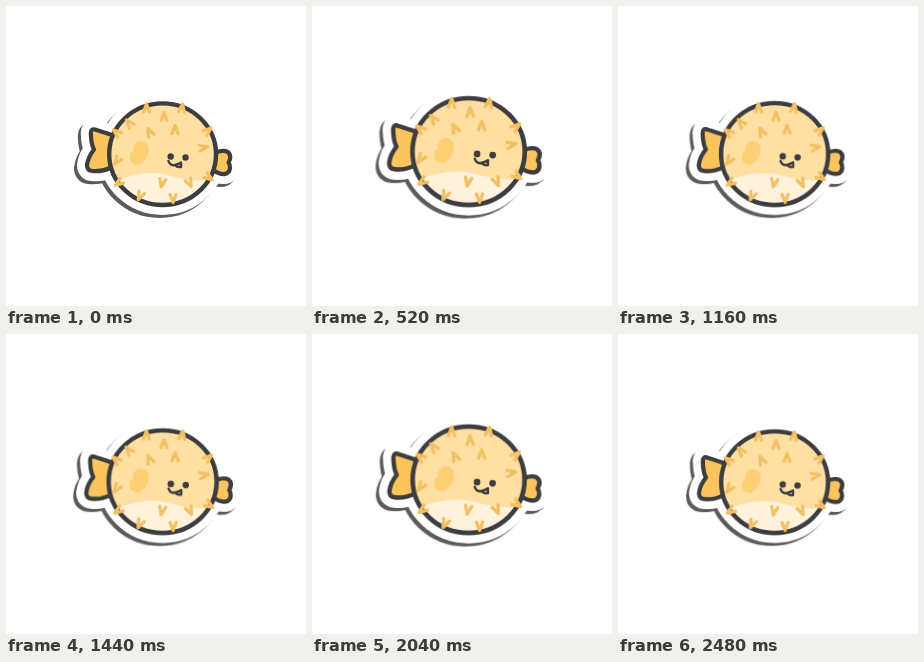
Write an HTML page without scripts that moves like this. It is 300 px wide and 300 px high and loops after 2.52 s.

```html
<!DOCTYPE html>
<html lang="en">
<head>
<meta charset="utf-8">
<title>Pufferfish sticker</title>
<style>
  html, body { margin: 0; width: 100%; height: 100%; overflow: hidden; background: #fff; }
  svg { display: block; width: 100vw; height: 100vh; }
  .fish {
    transform-origin: 157px 200px;
    animation: puff 1260ms cubic-bezier(.37, 0, .63, 1) infinite;
  }
  @keyframes puff {
    0%, 100% { transform: scale(1); animation-timing-function: cubic-bezier(.37, 0, .63, 1); }
    50% { transform: scale(1.055); }
  }

  .sticker { fill: #fff; stroke: #fff; stroke-width: 20; stroke-linejoin: round; filter: drop-shadow(-2.5px 3.7px 0 #5c5a5a); }
  .fins { fill: #fcc45c; stroke: #3d3d3f; stroke-width: 4.2; stroke-linejoin: round; }
  .spikes, .mouth { fill: none; stroke-linecap: round; stroke-linejoin: round; }
  .spikes { stroke: #f3c064; stroke-width: 3.2; }
  .mouth { stroke: #3d3d3f; stroke-width: 2.4; }
</style>
</head>
<body>
<svg viewBox="0 0 300 300">
  <defs>
    <ellipse id="round" cx="156.600" cy="148.200" rx="53.400" ry="50.800"/>
    <path id="tail" d="M106 129 L89 123.500 Q85 122.500 84.800 127 Q85 138 88 143.500 Q82 151 81 159 Q81 164.500 86 165 Q96 166 104 162"/>
    <path id="fin" d="M209 147.500 C213 144.500 221 143.500 223.500 148 C225.500 152 223.500 154.500 222.500 156.500 C224.500 159 225 165 221 167.300 C217 169 212 167.500 207 164"/>
    <path id="spike" d="M-3 4 L0 -4 L3 4"/>
    <clipPath id="inside"><use href="#round"/></clipPath>
  </defs>

  <g class="fish">
    <g class="sticker">
      <use href="#tail"/>
      <use href="#fin"/>
      <use href="#round"/>
    </g>

    <g class="fins">
      <use href="#tail"/>
      <use href="#fin"/>
    </g>

    <use href="#round" fill="#ffdfa2"/>
    <path clip-path="url(#inside)" fill="#fff2dd" d="M98 172 Q112 174 122 171 Q140 165 158 168 Q178 174 192 174.500 Q204 175 215 173 V205 H98Z"/>
    <g fill="#ffcf75">
      <circle cx="135" cy="143" r="7.700"/>
      <circle cx="131" cy="151.500" r="7.300"/>
      <path d="M131 159 Q141 156 142.800 145 L130 144Z"/>
    </g>
    <use href="#round" fill="none" stroke="#3d3d3f" stroke-width="4.400"/>

    <g class="spikes">
      <use href="#spike" transform="translate(140.500 102)"/>
      <use href="#spike" transform="translate(176 102) rotate(8)"/>
      <use href="#spike" transform="translate(123 117) rotate(-40)"/>
      <use href="#spike" transform="translate(110.500 126.500) rotate(-50)"/>
      <use href="#spike" transform="translate(143.500 126) rotate(-25)"/>
      <use href="#spike" transform="translate(158 110.500)"/>
      <use href="#spike" transform="translate(169 123.500)"/>
      <use href="#spike" transform="translate(202 124.500) rotate(50)"/>
      <use href="#spike" transform="translate(197.500 141.500) rotate(80)"/>
      <use href="#spike" transform="translate(111 155) rotate(215)"/>
      <use href="#spike" transform="translate(112.500 177) rotate(235)"/>
      <use href="#spike" transform="translate(134 190) rotate(205)"/>
      <use href="#spike" transform="translate(156 177) rotate(190)"/>
      <use href="#spike" transform="translate(167 192.500) rotate(180)"/>
      <use href="#spike" transform="translate(183.500 177) rotate(155)"/>
      <use href="#spike" transform="translate(203 171.500) rotate(125)"/>
    </g>

    <g fill="#3d3d3f">
      <circle cx="164.700" cy="150.500" r="3.200"/>
      <circle cx="179.500" cy="151.500" r="3.200"/>
    </g>
    <path class="mouth" d="M162.500 155 Q164 160 169 159 Q173 158 175 156.500 V161 Q171 161.500 169 159"/>
  </g>
</svg>
</body>
</html>
```
